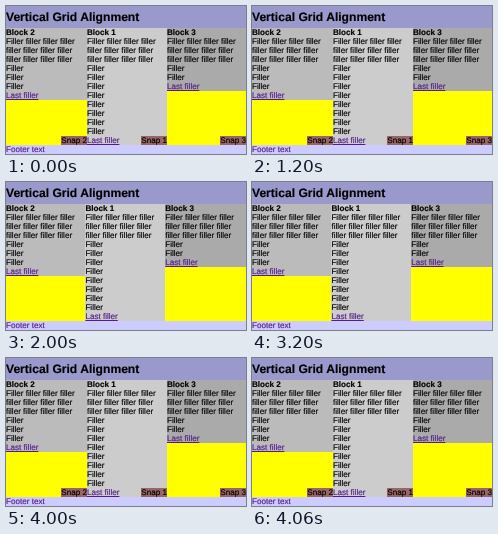
Write an HTML page that moves like this. It is 240x148 px and loops after 4.1 s.

```html
<!DOCTYPE html>
<html lang="en">
<head>
<meta charset="utf-8">
<title>Vertical Grid Alignment</title>
<style>
  html, body { margin: 0; width: 100%; height: 100%; overflow: hidden; }
  body { background: #ccf; color: #000; font: 8.1px/9px "Liberation Sans", Arial, sans-serif; white-space: nowrap; -webkit-text-stroke: .15px; text-rendering: geometricPrecision; }
  h1, h2, p { margin: 0; }
  h1 { height: 22px; box-sizing: border-box; padding-top: 4px; background: #99c; font-size: 12.1px; line-height: 14px; }
  h2 { font-size: inherit; }
  main { display: grid; grid-template-columns: 79.4px 79.8px 1fr; height: 117px; background: #ff0; }
  main.snapped { grid-template-columns: 81px 80px 1fr; }
  section { position: relative; }
  .text { background: var(--tone); }
  .link { color: #551a8b; text-decoration: underline; text-decoration-thickness: 1px; text-underline-offset: .5px; }
  .snap { position: absolute; right: 0; bottom: 0; background: #966; visibility: hidden; }
  .snapped .snap { visibility: visible; }
  footer { height: 9px; color: #551a8b; }
</style>
</head>
<body>
<h1>Vertical Grid Alignment</h1>
<main></main>
<footer>Footer text</footer>
<script>
const LOOP = 4100, SNAP_OFF = 2000, SNAP_ON = 4000;
const blocks = [
  { id: 2, fillers: 3, tone: '#bbb' },
  { id: 1, fillers: 8, tone: '#ccc' },
  { id: 3, fillers: 2, tone: '#aaa' },
];
const paragraph = 'Filler filler filler filler<br>filler filler filler filler<br>filler filler filler filler';
const grid = document.querySelector('main');

grid.innerHTML = blocks.map(({ id, fillers, tone }) => `
  <section style="--tone:${tone}">
    <div class="text">
      <h2>Block ${id}</h2>
      <p>${paragraph}</p>
      ${'<p>Filler</p>'.repeat(fillers)}
      <p><span class="link">Last filler</span></p>
    </div>
    <div class="snap">Snap ${id}</div>
  </section>`).join('');

function draw(now) {
  const time = now % LOOP;
  grid.classList.toggle('snapped', time < SNAP_OFF || time >= SNAP_ON);
  requestAnimationFrame(draw);
}
draw(performance.now());
</script>
</body>
</html>
```
